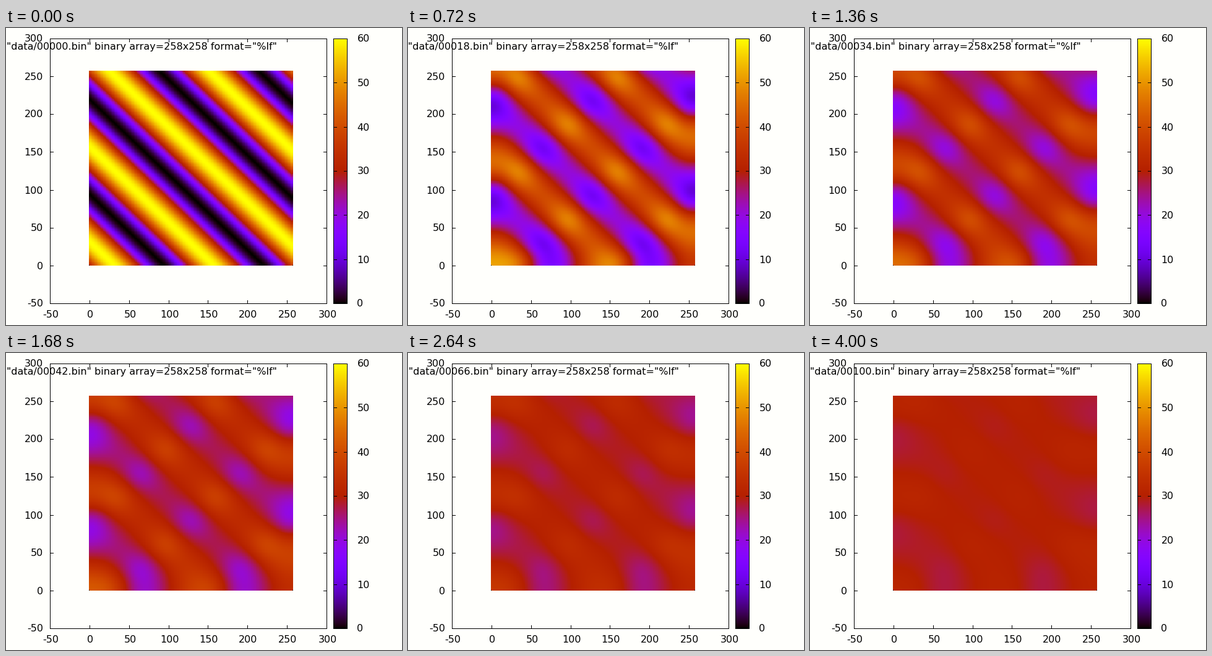
Recreate the animation shown at these times as a matplotlib script. Size 640 px wide and 480 px high, loop 4.04 s.

```python
import numpy as np
import matplotlib.pyplot as plt
from matplotlib.animation import FuncAnimation

W, H, DPI = 640, 480, 100
PX = 72 / DPI
N, ROWS = 256, 512            # the plate is taller than the part shown
VIEW = N + 2
FRAMES, INTERVAL = 101, 40
STEPS, DT = 80, 1.25          # 100 time units per frame

LEFT, RIGHT, TOP, BOTTOM = 71, 518, 17, 445
BAR_L, BAR_R = 529, 551
TICK = 5

plt.rcParams["font.family"] = "DejaVu Sans"
plt.rcParams["font.size"] = 16 * PX


def palette(v):
    """Black-violet-red-yellow ramp for 0..60."""
    t = np.clip(v / 60, 0, 1)
    blue = np.clip(np.sin(2 * np.pi * t), 0, 1)
    rgb = np.stack([np.sqrt(t), t ** 3, blue], axis=-1)
    return np.round(rgb * 255).astype(np.uint8)


def mirror(u):
    u[0, 1:-1] = u[2, 1:-1]
    u[-1, 1:-1] = u[-3, 1:-1]
    u[1:-1, 0] = u[1:-1, 2]
    u[1:-1, -1] = u[1:-1, -3]


def simulate():
    """Heat equation with uneven diffusivity and insulated edges."""
    y, x = np.mgrid[1:ROWS + 1, 1:N + 1]
    rate = 0.05 + (30 + 30 * np.sin((N - x + y) / 20)) / 605
    rate = (rate * DT).astype(np.float32)
    u = np.zeros((ROWS + 2, N + 2), np.float32)
    inner = u[1:-1, 1:-1]
    inner[:] = 30 + 30 * np.sin((x + y) / 20)
    mirror(u)
    lap = np.empty_like(rate)
    four = np.float32(4)
    states = [u[:VIEW].copy()]
    for _ in range(FRAMES - 1):
        for _ in range(STEPS):
            np.add(u[:-2, 1:-1], u[2:, 1:-1], out=lap)
            lap += u[1:-1, :-2]
            lap += u[1:-1, 2:]
            lap -= four * inner
            lap *= rate
            inner += lap
            mirror(u)
        states.append(u[:VIEW].copy())
    return states


states = simulate()

fig = plt.figure(figsize=(W / DPI, H / DPI), dpi=DPI, facecolor="#fffffc")
ax = fig.add_axes([0, 0, 1, 1])
ax.axis("off")


def line(xs, ys):
    """Line through pixel centres, one pixel wide."""
    ax.plot(np.array(xs) + 0.5, np.array(ys) + 0.5, color="black", lw=PX,
            solid_capstyle="projecting", solid_joinstyle="miter",
            snap=False, zorder=3)


def box(x0, x1, y0, y1):
    line([x0, x1, x1, x0, x0], [y0, y0, y1, y1, y0])


def label(x, y, s, ha):
    return ax.text(x, y, s, ha=ha, va="baseline", color="black", zorder=4)


def side_ticks(x0, x1, y):
    line([x0, x0 + TICK], [y, y])
    line([x1 - TICK, x1], [y, y])


field = ax.imshow(palette(states[0]), extent=(134, 464, 384, 69),
                  origin="lower", interpolation="nearest", aspect="auto")
ramp = np.linspace(60, 0, BOTTOM - TOP)[:, None]
ax.imshow(palette(ramp), extent=(BAR_L, BAR_R + 1, BOTTOM, TOP),
          origin="upper", interpolation="nearest", aspect="auto")

box(LEFT, RIGHT, TOP, BOTTOM)
box(BAR_L, BAR_R, TOP, BOTTOM)

for v in range(-50, 301, 50):
    f = (v + 50) / 350
    x = round(LEFT + f * (RIGHT - LEFT))
    y = round(BOTTOM - f * (BOTTOM - TOP))
    line([x, x], [TOP, TOP + TICK])
    line([x, x], [BOTTOM - TICK, BOTTOM])
    side_ticks(LEFT, RIGHT, y)
    label(x + 1.5, 468, str(v), "center")
    label(60, y + 5.5, str(v), "right")

for v in range(0, 61, 10):
    y = round(BOTTOM - v / 60 * (BOTTOM - TOP))
    side_ticks(BAR_L, BAR_R, y)
    label(567.5, y + 5.5, str(v), "left")

title = label(437.5, 35, "", "right")

ax.set_xlim(0, W)
ax.set_ylim(H, 0)


def update(i):
    field.set_data(palette(states[i]))
    title.set_text(f'"data/{i:05d}.bin" binary array=258x258 format="%lf"')
    return field, title


anim = FuncAnimation(fig, update, frames=FRAMES, interval=INTERVAL,
                     repeat=True, repeat_delay=0, blit=False)
plt.show()
```
